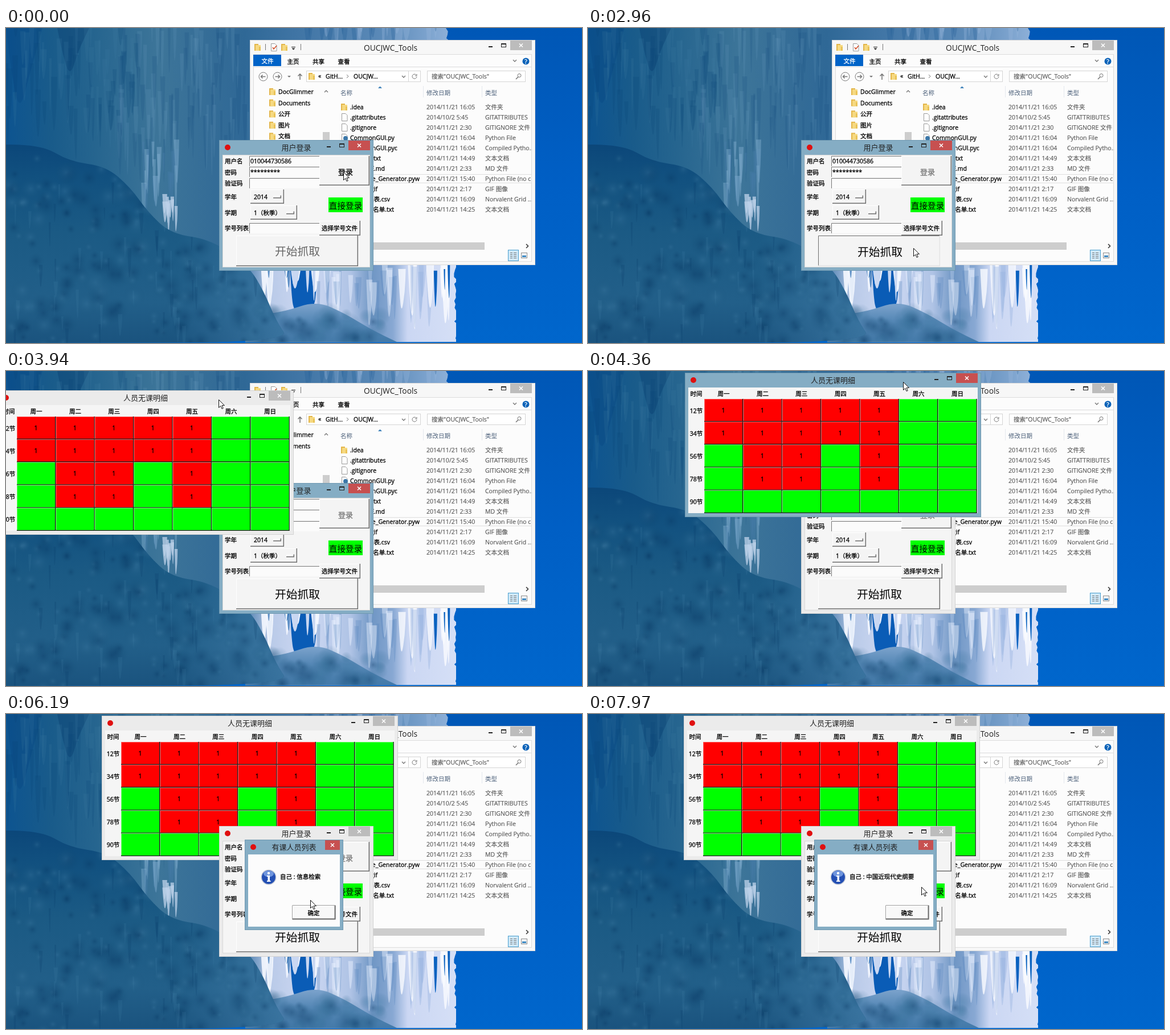
Animation of 1011 by 554 pixels, one loop 8 s. Source, as an HTML page with a canvas:

```html
<!DOCTYPE html>
<html lang="zh-CN">
<head>
<meta charset="utf-8">
<title>OUCJWC_Tools</title>
<style>
html, body { margin: 0; width: 100%; height: 100%; overflow: hidden; background: #0062c8; }
main { position: absolute; inset: 0; overflow: clip; contain: strict; }
canvas, svg { position: absolute; left: 0; top: 0; }
svg { width: 1011px; height: 554px; overflow: hidden; }
text { font: 500 10.5px "Open Sans", "Noto Sans CJK SC", "Noto Sans CJK", sans-serif; dominant-baseline: central; white-space: pre; stroke: #000; stroke-width: .3px; }
.mid { text-anchor: middle; }
.end { text-anchor: end; }
.title { font-size: 13px; font-weight: 400; fill: #222; stroke: none; }
.frame { fill: var(--f, #f7f7f7); stroke: var(--e, #dadada); }
.close { fill: var(--c, #bcbcbc); }
.hi, .lo, .line { fill: none; stroke: #777; }
.hi { stroke: var(--hi, #fff); }
.lo { stroke: var(--lo, #6f6f6f); stroke-width: 1.5; }
.grey { fill: #555; stroke: #555; stroke-width: .15px; }
.head { fill: #4c607a; stroke: none; }
.white { fill: #fff; stroke: #fff; }

#files { z-index: 1; }
#login { z-index: 3; }
#grid { z-index: 2; width: 690px; height: 258px; }
.dialog { z-index: 5; --f: #85adc4; --e: #6d97b0; --c: #c75050; }
#cursor { z-index: 9; width: 12px; height: 19px; }

.dialog, #login, #grid, #cursor, #enter, #enterText, #start, #startText, .ok { animation: 8s step-end infinite; }
#login { animation-name: login; }
#grid { animation-name: grid; }
#cursor { animation-name: cursor; }
#enter { animation-name: enter; }
#enterText { animation-name: enterText; font-size: 13px; }
#start { animation-name: start; }
#startText { animation-name: startText; font-size: 19.8px; font-weight: 400; stroke: none; }
#done { animation-name: done; }
#courseA { animation-name: courseA; }
#courseB { animation-name: courseB; }
#done .ok { animation-name: okDone; }
#courseA .ok { animation-name: okCourse; }

@keyframes login {
  0%, 24.375%, 80.95% { --f: #85adc4; --e: #6d97b0; --c: #c75050; }
  5.125%, 51.125%, 72.125%, 91.1% { --f: #ebebeb; --e: #d2d2d2; --c: #bcbcbc; }
}
@keyframes grid {
  0% { opacity: 0; z-index: 4; transform: translate(-185px, 31px); --f: #ebebeb; --e: #d2d2d2; --c: #bcbcbc; }
  40.5% { opacity: .5; }
  42.25% { opacity: 1; }
  51.125% { transform: translate(-185px, 31px); --f: #85adc4; --e: #6d97b0; --c: #c75050; }
  52.8125% { transform: translate(-80px, 12px); }
  54.5% { transform: none; }
  58.25% { transform: translate(-2px, 0); }
  72.125% { z-index: 2; --f: #ebebeb; --e: #d2d2d2; --c: #bcbcbc; }
  91.1% { z-index: 4; --f: #85adc4; --e: #6d97b0; --c: #c75050; }
  94.43%, 100% { opacity: 1; z-index: 2; transform: translate(-2px, 0); --f: #ebebeb; --e: #d2d2d2; --c: #bcbcbc; }
}
@keyframes enter {
  0%, 5.125% { --hi: #fff; --lo: #6f6f6f; }
  3.5% { --hi: #6f6f6f; --lo: #fff; }
}
@keyframes enterText { 0% { fill: #000; stroke: #000; } 5.125%, 100% { fill: #777; stroke: #777; } }
@keyframes start {
  0%, 38.75% { --hi: #fff; --lo: #6f6f6f; }
  37% { --hi: #6f6f6f; --lo: #e4e4e4; }
}
@keyframes startText {
  0% { fill: #666; transform: none; }
  5.125% { fill: #000; }
  37% { transform: translate(1px, 1px); }
  38.75%, 100% { fill: #000; transform: none; }
}
@keyframes done { 0%, 24.375%, 100% { opacity: 0; } 6.75% { opacity: .6; } 8.375% { opacity: 1; } }
@keyframes courseA { 0%, 80.95%, 100% { opacity: 0; } 73.88% { opacity: 1; } }
@keyframes courseB { 0% { opacity: 0; } 99.62%, 100% { opacity: 1; } }
@keyframes okDone { 0%, 24.375% { --hi: #fff; --lo: #6f6f6f; } 22.625% { --hi: #6f6f6f; --lo: #fff; } }
@keyframes okCourse { 0%, 80.95% { --hi: #fff; --lo: #6f6f6f; } 79.25% { --hi: #6f6f6f; --lo: #fff; } }
@keyframes cursor {
  0% { transform: translate(592px, 253px); }
  12.25% { transform: translate(570px, 275px); }
  13.9375% { transform: translate(530px, 322px); }
  15.625% { transform: translate(510px, 347px); }
  26.125% { transform: translate(540px, 350px); }
  27.875% { transform: translate(571px, 355px); }
  31.375% { transform: translate(571px, 372px); }
  33.25% { transform: translate(571px, 387px); }
  42.25% { transform: translate(545px, 330px); }
  44% { transform: translate(500px, 240px); }
  45.75% { transform: translate(450px, 150px); }
  47.5% { transform: translate(400px, 75px); }
  49.25% { transform: translate(373px, 50px); }
  52.8125% { transform: translate(475px, 31px); }
  54.5% { transform: translate(553px, 19px); }
  58.25% { transform: translate(551px, 19px); }
  59.95% { transform: translate(540px, 36px); }
  61.66% { transform: translate(522px, 62px); }
  63.38% { transform: translate(506px, 88px); }
  65.1% { transform: translate(499px, 104px); }
  66.8% { transform: translate(495px, 112px); }
  73.88% { transform: translate(507px, 180px); }
  75.65% { transform: translate(524px, 270px); }
  77.375% { transform: translate(534px, 327px); }
  82.73% { transform: translate(520px, 250px); }
  84.5% { transform: translate(480px, 165px); }
  86.125% { transform: translate(440px, 120px); }
  87.78% { transform: translate(392px, 90px); }
  89.44% { transform: translate(372px, 76px); }
  96.09% { transform: translate(450px, 170px); }
  97.75% { transform: translate(540px, 270px); }
  99.62%, 100% { transform: translate(585px, 304px); }
}
</style>
</head>
<body>
<main>
<canvas id="cave" width="1011" height="554"></canvas>
<svg id="files"></svg>
<svg id="login"></svg>
<svg id="grid"></svg>
<svg id="done" class="dialog"></svg>
<svg id="courseA" class="dialog"></svg>
<svg id="courseB" class="dialog"></svg>
<svg id="cursor"><path d="M.5 .5V14.5L3.8 11.4L6 16.5L8.2 15.5L6 10.6H10.4Z" fill="#fff" stroke="#111"/></svg>
</main>

<script>
const $ = id => document.getElementById(id);
const rect = (x, y, w, h, fill, extra = '') => `<rect x="${x}" y="${y}" width="${w}" height="${h}" fill="${fill}" ${extra}/>`;
const text = (x, y, s, extra = '') => `<text x="${x}" y="${y}" ${extra}>${s}</text>`;
const line = (d, extra = '') => `<path class="line" d="${d}" ${extra}/>`;
const mid = 'class="mid"';

// Bevelled box from (x, y) to (r, b)
const bevel = (x, y, r, b, fill = '#f4f4f4') => rect(x, y, r - x, b - y, fill) +
  `<path class="hi" d="M${x + .5} ${b}V${y + .5}H${r}"/><path class="lo" d="M${x} ${b - .7}H${r - .7}V${y}"/>`;

function frame(x, y, r, b, title, { small = false, dot = true, cx = (x + r) / 2, size = 13 } = {}) {
  const w = small ? 26 : 38, cl = r - w - 6, m = cl + w / 2;
  let s = `<rect class="frame" x="${x + .5}" y="${y + .5}" width="${r - x - 1}" height="${b - y - 1}"/>`;
  if (dot) s += `<circle cx="${x + 15}" cy="${y + 13}" r="5" fill="#e01010"/>`;
  s += text(cx, y + 13, title, `class="mid title" style="font-size:${size}px"`);
  s += `<rect class="close" x="${cl}" y="${y + 1}" width="${w}" height="17"/>`;
  s += line(`M${m - 3} ${y + 6.5}l6 6m0-6l-6 6`, 'style="stroke:#fff;stroke-width:1.5"');
  if (!small) s += rect(r - 82, y + 11, 7, 2, '#222') + rect(r - 59.5, y + 6.5, 8, 6, 'none', 'stroke="#222"') + rect(r - 60, y + 6, 9, 2, '#222');
  return s;
}

function drawFiles() {
  const folder = (x, y) => rect(x - 5, y - 6, 7, 12, '#e3b64a') + rect(x - 3, y - 4, 9, 10, '#f6d981') + rect(x + 3, y - 1, 3, 7, '#e9c257');
  const page = (x, y) => `<path d="M${x - 4.5} ${y - 6.5}h6.5l3 3v10h-9.5z" fill="#fff" stroke="#9a9a9a"/>`;
  const chevron = (x, y, up) => line(`M${x - 3} ${y + (up ? 2 : -2)}l3 ${up ? -3 : 3}l3 ${up ? 3 : -3}`, 'stroke-width="1.4"');
  let s = frame(428, 21, 929, 417, 'OUCJWC_Tools', { dot: false, cx: 675, size: 13.8 });
  s += rect(434.5, 46.5, 488, 364, '#fcfcfc', 'stroke="#dcdcdc"');
  s += folder(441, 34) + page(470, 34) + folder(488, 34);
  s += line('M455.5 28V39M517.5 28V39') + line('M468 34l2 3l5-6', 'style="stroke:#d4502a;stroke-width:1.6"');
  s += '<path d="M501 33h7v1h-7zM501.5 35.5h6l-3 3z" fill="#222"/>';

  s += rect(434, 47, 49, 20, '#0063c8') + text(459, 57.5, '文件', 'class="mid white"');
  ['主页', '共享', '查看'].forEach((t, i) => s += text(504 + i * 44.5, 58.5, t, mid));
  s += line('M434 68.5H923', 'style="stroke:#dadbdc"') + chevron(893, 58);
  s += '<circle cx="912.5" cy="58.5" r="6" fill="#0b62b8"/>' + text(912.5, 58.5, '?', 'class="mid white"');

  for (const [x, d] of [[451.5, -1], [476.5, 1]])
    s += `<circle class="line" cx="${x}" cy="85.5" r="7.5"/>` + line(`M${x - 4} 85.5h8M${x + d} 82.5l${d * 3} 3l${-d * 3} 3`, 'stroke-width="1.5"');
  s += '<path d="M494 84h6l-3 3z" fill="#777"/>' + line('M516 91V81M512.5 84.5L516 81l3.5 3.5', 'stroke-width="1.6"');
  s += rect(527.5, 75.5, 200, 19, '#fff', 'stroke="#d5d5d5"') + rect(739.5, 75.5, 172, 19, '#fff', 'stroke="#d5d5d5"');
  s += folder(536, 85) + text(548, 84, '«') + text(561, 85, 'GitH...') + line('M598 82l3 3l-3 3') + text(610, 85, 'OUCJW...');
  s += chevron(698, 86) + line('M706.5 76V94', 'style="stroke:#d5d5d5"') + line('M720 82.5a4 4 0 1 0 1 3M721 81v3h-3');
  s += text(747, 85, '搜索"OUCJWC_Tools"', 'class="grey"') + '<circle class="line" cx="901" cy="83.5" r="3"/>' + line('M899 86l-4 4', 'stroke-width="1.6"');

  ['DocGlimmer', 'Documents', '公开', '图片', '文档'].forEach((t, i) => {
    const y = 112 + i * 19.6;
    s += folder(467, y) + text(478, y, t);
  });
  s += chevron(562, 111, true) + rect(556, 183, 12, 60, '#cdcdcd');

  s += text(587, 114, '名称', 'class="head"') + text(738, 114, '修改日期', 'class="head"') + text(841, 114, '类型', 'class="head"');
  s += line('M732.5 102V122M835.5 102V122', 'style="stroke:#e4e8ee"') + '<path d="M653 106l3.5-3.5l3.5 3.5z" fill="#3a7fb8"/>';
  s += rect(587.5, 257.5, 335, 15, 'none', 'stroke="#dedede"');
  const rows = [
    ['.idea', '11/21 16:05', '文件夹'],
    ['.gitattributes', '10/2 5:45', 'GITATTRIBUTES'],
    ['.gitignore', '11/21 2:30', 'GITIGNORE 文件'],
    ['CommonGUI.py', '11/21 16:04', 'Python File'],
    ['CommonGUI.pyc', '11/21 16:04', 'Compiled Pytho...'],
    ['list.txt', '11/21 14:49', '文本文档', 658],
    ['README.md', '11/21 2:33', 'MD 文件', 665],
    ['Table_Generator.pyw', '11/21 15:40', 'Python File (no c', 726],
    ['code.gif', '11/21 2:17', 'GIF 图像', 652],
    ['课表.csv', '11/21 16:09', 'Norvalent Grid ...', 674],
    ['人员名单.txt', '11/21 14:25', '文本文档', 681]
  ];
  s += '<clipPath id="pane"><path d="M434 47H922.5V410H434z"/></clipPath><g clip-path="url(#pane)">';
  rows.forEach(([name, date, type, end], i) => {
    const y = 139 + i * 18;
    s += i ? page(594, y) : folder(593, y);
    if (i == 3 || i == 4) s += `<circle cx="596" cy="${y + 1}" r="4" fill="#3b77a8"/>`;
    s += text(end || 604, y, name, end ? 'class="end"' : '');
    s += text(738, y, '2014/' + date, 'class="grey"') + text(841, y, type, 'class="grey"');
  });
  s += '</g>' + rect(590, 377, 250, 13, '#cdcdcd') + line('M913 380l3.5 3.5l-3.5 3.5', 'style="stroke:#333;stroke-width:1.5"');
  s += rect(881.5, 390.5, 18, 19, '#cfe8f8', 'stroke="#4aa0d0"');
  s += line('M885 395.5h4m2 0h5M885 398.5h4m2 0h5M885 401.5h4m2 0h5M885 404.5h4m2 0h5');
  s += rect(904.5, 395.5, 10, 9, '#fff', 'stroke="#888"') + rect(906, 400, 7, 3, '#3a86c0');
  $('files').innerHTML = s;
}

function drawLogin() {
  const entry = (y, s = '') => rect(427, y, 123, 18, '#fbfbfb') + line(`M427.5 ${y + 18}V${y + .5}H550`) + text(429, y + 9, s);
  const menu = (y, r, b, s) => bevel(429, y, r, b) + text(435, (y + b) / 2 + .5, s) + bevel(r - 19, (y + b) / 2 - 2, r - 5, (y + b) / 2 + 3);
  let s = frame(374, 197, 645, 427, '用户登录') + rect(380.5, 223.5, 258, 197, '#f5f5f5', 'stroke="#d8d8d8"');
  const labels = { 用户名: 234, 密码: 254, 验证码: 273, 学年: 297, 学期: 325, 学号列表: 352 };
  for (const k in labels) s += text(384, labels[k], k);
  s += entry(225, '010044730586') + entry(244, '*********') + entry(264) + entry(343);
  s += menu(284, 488, 309, '2014') + menu(312, 511, 337, '1（秋季）');
  s += `<g id="enter">${bevel(550, 225, 638, 277)}</g>` + text(596, 253, '登录', 'id="enterText" class="mid"');
  s += rect(566, 298, 60, 26, '#0f0') + text(596, 312, '直接登录', 'class="mid" style="font-size:14.6px;stroke:none"');
  s += bevel(550, 339, 622, 365) + text(585.5, 352, '选择学号文件', mid);
  s += `<g id="start">${bevel(404, 365, 618, 419)}</g>` + text(511.5, 392.5, '开始抓取', 'id="startText" class="mid"');
  $('login').innerHTML = s;
}

function drawGrid() {
  const busy = ['1111100', '1111100', '0110100', '0110100', '0000000'];
  let s = frame(170, 3, 690, 257, '人员无课明细') + rect(176, 29, 508, 221, '#f5f5f5') + text(190, 40, '时间', mid);
  [...'一二三四五六日'].forEach((d, c) => s += text(238 + c * 68.4, 40, '周' + d, mid));
  busy.forEach((row, r) => {
    const y = 49 + r * 40.2;
    s += text(190, y + 20.5, ['12', '34', '56', '78', '90'][r] + '节', mid);
    [...row].forEach((v, c) => {
      const x = 204 + c * 68.4, on = v == 1;
      s += rect(x, y, 68.4, 40.2, '#101010') + rect(x, y, 67, 38.8, on ? '#ff7070' : '#7dff7d') + rect(x + 1, y + 1, 66, 37.8, on ? '#f00' : '#0f0');
      if (on) s += text(x + 33.5, y + 20, '1', mid);
    });
  });
  $('grid').innerHTML = s;
}

function drawDialog(id, x, r, title, msg) {
  const cx = x + 42;
  $(id).innerHTML = frame(x, 221, r, 380, title, { small: true }) + rect(x + 6, 247, r - x - 12, 127, '#fcfcfc') +
    `<circle cx="${cx}" cy="287" r="13.5" fill="#c9ced8"/><circle cx="${cx}" cy="287" r="12" fill="#2450b4"/><ellipse cx="${cx}" cy="281" rx="9" ry="5.5" fill="#6f95dd"/>` +
    rect(cx - 1.5, 284, 3.5, 10, '#fff') + rect(cx - 3, 284, 4, 2, '#fff') + rect(cx - 3, 293, 6.5, 2, '#fff') + `<circle cx="${cx}" cy="280" r="2.2" fill="#fff"/>` +
    text(x + 62, 286, msg) +
    `<g class="ok">${rect(r - 89.5, 336.5, 76, 25, '#444')}${bevel(r - 89, 337, r - 14, 361, '#f8f8f8')}</g>` + text(r - 52, 349.5, '确定', mid);
}

// Ice cave wallpaper
function drawCave() {
  const g = $('cave').getContext('2d');
  let seed = 11;
  const rnd = (a = 0, b = 1) => a + (b - a) * ((seed = seed * 16807 % 2147483647) / 2147483647);
  const ramp = (x0, y0, x1, y1, ...stops) => {
    const r = g.createLinearGradient(x0, y0, x1, y1);
    stops.forEach(([p, c]) => r.addColorStop(p, c));
    return r;
  };
  const outline = p => {
    g.beginPath();
    g.moveTo(p[0], p[1]);
    for (let i = 2; i < p.length - 2; i += 2)
      g.quadraticCurveTo(p[i], p[i + 1], (p[i] + p[i + 2]) / 2, (p[i + 1] + p[i + 3]) / 2);
    g.lineTo(p[p.length - 2], p[p.length - 1]);
    g.closePath();
  };
  const shape = (fill, ...p) => { outline(p); g.fillStyle = fill; g.fill(); };
  const icicles = (n, x0, x1, y0, y1, len, wide, ...tints) => {
    for (let i = 0; i < n; i++) {
      const x = rnd(x0, x1), y = rnd(y0, y1), h = rnd(.4, 1) * len, w = rnd(.3, 1) * wide;
      shape(tints[i % tints.length], x - w, y, x - w * .7, y + h * .5, x + rnd(-1, 1), y + h, x + w * .8, y + h * .5, x + w, y);
    }
  };
  const lumps = (n, x0, x1, y0, y1) => {
    for (let i = 0; i < n; i++) {
      const x = rnd(x0, x1), y = rnd(y0, y1), r = rnd(8, 24);
      const tint = g.createRadialGradient(x, y, 0, x, y, r);
      tint.addColorStop(0, i % 2 ? 'rgba(62,122,162,.3)' : 'rgba(4,48,92,.3)');
      tint.addColorStop(1, 'rgba(20,80,120,0)');
      g.fillStyle = tint;
      g.fillRect(x - r, y - r, r * 2, r * 2);
    }
  };

  g.fillStyle = ramp(0, 0, 0, 554, [0, '#0057b6'], [.5, '#005fc5'], [1, '#0066cc']);
  g.fillRect(0, 0, 1011, 554);

  g.save();
  g.beginPath();
  g.moveTo(0, 0);
  g.lineTo(774, 0);
  for (let y = 0; y <= 554; y += 6) g.lineTo(776 + Math.min(y / 30, 14) + rnd(-4, 4), y);
  g.lineTo(0, 554);
  g.clip();

  // Hanging ice on the back wall
  g.fillStyle = ramp(0, 0, 790, 0, [0, '#0d5490'], [.1, '#195b8a'], [.2, '#26658f'], [.34, '#3d7599'], [.45, '#356d97'], [.53, '#2f6896'], [.64, '#3f74a4'], [.85, '#5d8bb9'], [1, '#93b4dc']);
  g.fillRect(0, 0, 790, 430);
  shape('rgba(8,60,110,.4)', 90, 0, 98, 40, 112, 88, 127, 40, 146, 0);
  shape('rgba(8,70,130,.4)', 0, 0, 12, 100, 25, 145, 42, 80, 64, 0);
  icicles(80, 0, 230, -30, 150, 110, 6, 'rgba(9,66,118,.2)', 'rgba(64,124,163,.18)');
  icicles(90, 190, 428, -30, 200, 120, 5, 'rgba(100,150,183,.2)', 'rgba(20,78,125,.2)');
  icicles(24, 520, 775, -30, 0, 70, 8, 'rgba(150,182,218,.35)', 'rgba(34,92,150,.3)');
  icicles(22, 235, 300, 190, 280, 100, 5, 'rgba(139,179,213,.4)', 'rgba(70,124,168,.4)');
  icicles(9, 262, 305, 285, 315, 70, 5, 'rgba(190,210,234,.75)');

  // Bright curtain below the windows
  g.fillStyle = ramp(420, 0, 790, 0, [0, '#4d7fae'], [.12, '#b9cae8'], [.3, '#ced9f3'], [.5, '#afc3e5'], [.6, '#6f96c4'], [.7, '#88a8d3'], [.77, '#cbd7f3'], [1, '#d5dff6']);
  g.fillRect(420, 400, 370, 154);
  shape('#0a5cb6', 498, 400, 500, 460, 506, 505, 540, 500, 546, 450, 548, 400);
  icicles(8, 445, 500, 400, 430, 85, 7, 'rgba(245,249,255,.9)', 'rgba(36,104,176,.7)');
  icicles(6, 502, 545, 400, 425, 95, 8, '#f2f6ff', '#c9d7f2');
  icicles(24, 548, 700, 400, 450, 110, 7, 'rgba(235,242,255,.45)', 'rgba(88,134,188,.3)');
  icicles(16, 695, 788, 400, 430, 140, 8, 'rgba(250,252,255,.8)', 'rgba(150,178,222,.4)');
  icicles(3, 745, 786, 410, 430, 100, 4, '#0a62c0');
  shape(ramp(0, 488, 0, 554, [0, '#78a0ca'], [.4, '#5688b6'], [1, '#4379a8']), 420, 554, 440, 505, 488, 499, 545, 480, 595, 502, 640, 530, 690, 554);
  lumps(40, 440, 660, 500, 554);

  // Dark rock in front
  outline([0, 205, 60, 204, 112, 235, 175, 243, 218, 280, 250, 325, 290, 362, 360, 372, 425, 418, 452, 462, 474, 515, 500, 554, 0, 554]);
  g.fillStyle = ramp(0, 200, 0, 554, [0, '#0b4679'], [.17, '#11507f'], [.45, '#1b5a84'], [.8, '#225f89'], [1, '#1a537e']);
  g.fill();
  g.clip();
  g.fillStyle = ramp(300, 0, 490, 0, [0, 'rgba(70,128,172,0)'], [1, 'rgba(70,128,172,.7)']);
  g.fillRect(300, 350, 200, 204);
  lumps(260, 0, 490, 225, 560);
  icicles(60, 0, 470, 260, 530, 60, 4, 'rgba(7,55,100,.2)', 'rgba(80,140,180,.13)');
  g.restore();
}

drawCave();
drawFiles();
drawLogin();
drawGrid();
drawDialog('done', 427, 580, '恭喜你！', '登录成功！');
drawDialog('courseA', 419, 592, '有课人员列表', '自己 : 信息检索');
drawDialog('courseB', 397, 612, '有课人员列表', '自己 : 中国近现代史纲要');
</script>
</body>
</html>
```
